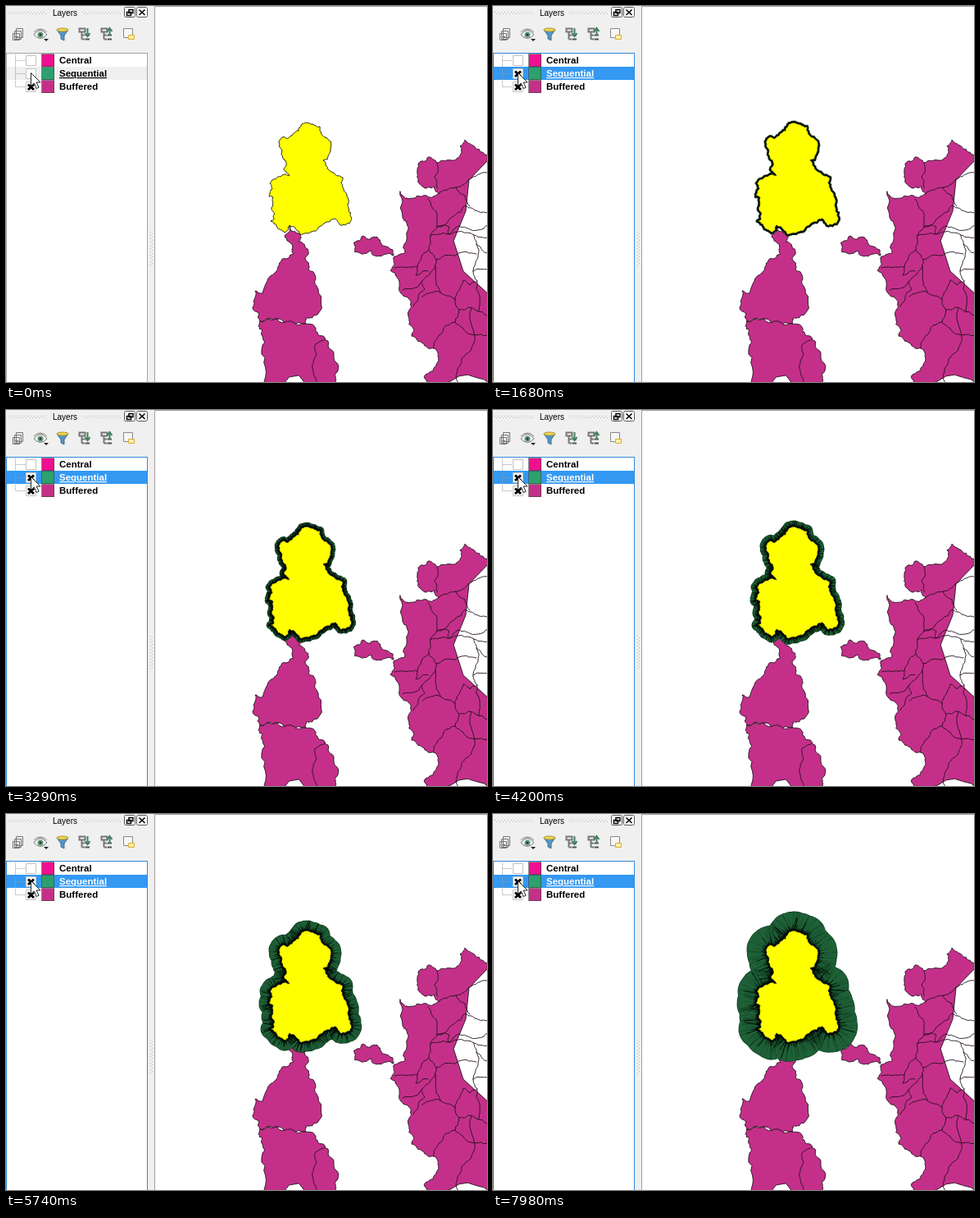
Recreate the animation shown at these times as an HTML page. Size 587 by 458 pixels, loop 8 s.

```html
<!DOCTYPE html>
<html lang="en">
<head>
<meta charset="utf-8">
<title>Sequential buffer</title>
<style>
  html, body { margin: 0; width: 100%; height: 100%; overflow: hidden; background: #fff; }
  svg { display: block; width: 587px; height: 458px; }
  text { font-family: "Liberation Sans", Arial, sans-serif; }
  .name { font-size: 11.5px; font-weight: bold; }
  .crisp { shape-rendering: crispEdges; }
  #map path { stroke-linejoin: round; stroke-linecap: round; }
</style>
</head>
<body>
<svg viewBox="0 0 587 458">
  <defs>
    <path id="box" d="M24.5 .5h12v12h-12z" fill="#fff" stroke="#c3c3c3"/>
    <path id="cross" d="M27 3.5l7 6.5m0-6.5l-7 6.5" stroke="#000" stroke-width="3"/>
    <g id="tree" fill="none" stroke="#777">
      <path d="M.5 .5h7v4h-7zm3 4v9m0-5h4m-4 5h4"/>
      <path d="M8 8.5h5m-5 5h5" stroke="#4b5157" stroke-width="2"/>
    </g>
  </defs>

  <g id="map"></g>

  <rect width="181" height="458" fill="#f0f0f0"/>
  <path class="crisp" d="M181.5 458V.5H587" fill="none" stroke="#a0a0a0"/>
  <g fill="none" stroke="#b5b5b5" stroke-dasharray="1 3">
    <path d="M2 7.5h48m-46 2h46m43-2h48m-46 2h46"/>
    <path d="M176.5 275v41m2-39v39"/>
  </g>
  <text x="57" y="12" font-size="10">Layers</text>
  <g fill="#fff" stroke="#555">
    <rect x="144.5" y="1.5" width="13" height="12" rx="2"/>
    <rect x="159.5" y="1.5" width="13" height="12" rx="2"/>
    <path d="M150 4.5h5v4h-5zm-2.500 3h5v4h-5z" stroke="#000" stroke-width="1.5"/>
    <path d="M162.500 4.500l7 6.500m0-6.500l-7 6.500" stroke="#000" stroke-width="1.7"/>
  </g>

  <path d="M12.5 27.5h8v11h-8zm-2 3h8v10h-8zm-2 3h8v8h-8zm1.500 4h5m-2.500-2.500v5" fill="#eee" stroke="#777"/>
  <path d="M34 35q8-11 16 0q-8 9-16 0zm0-3q8-8 16 0" fill="#f7f7f7" stroke="#777"/>
  <circle cx="42" cy="35" r="3.5" fill="#5d9977"/><circle cx="42" cy="35" r="1.5" fill="#333"/>
  <path d="M46 40h6l-3 3z" fill="#222"/>
  <path d="M62 29h14l-5 7v6l-4-2v-4z" fill="#5793c4" stroke="#47718f"/>
  <ellipse cx="69" cy="29" rx="7" ry="2" fill="#f3d64b" stroke="#a89336"/>
  <g fill="none" stroke="#43815f" stroke-width="2">
    <use href="#tree" x="89" y="27"/><path d="M99.5 27v9m-3-3l3 4 3-4"/>
    <use href="#tree" x="116" y="27"/><path d="M126.5 36v-9m-3 4l3-4 3 4"/>
  </g>
  <path d="M143.5 27.5h11v11h-11z" fill="#f6f6f6" stroke="#888"/>
  <path d="M149.5 35.5h7v5h-7z" fill="#fff0a6" stroke="#d9ad38"/>

  <rect id="list" class="crisp" x=".5" y="57.5" width="172" height="401" fill="#fff"/>
  <rect id="row" class="crisp" x="1" y="74" width="171" height="16"/>
  <path class="crisp" d="M11.5 59v40m0-32.500h11m-11 16h11m-11 16h11" fill="none" stroke="#999" stroke-dasharray="1 1"/>
  <g class="crisp" stroke="#444" stroke-opacity=".65">
    <rect x="43.5" y="58.5" width="15" height="15" fill="#f0108f"/>
    <rect x="43.5" y="74.5" width="15" height="15" fill="#2ca16d"/>
    <rect x="43.5" y="90.5" width="15" height="15" fill="#c43089"/>
  </g>
  <use href="#box" y="60"/><use href="#box" y="76"/><use href="#box" y="92"/>
  <use id="check" href="#cross" y="76"/><use href="#cross" y="92"/>
  <text class="name" x="65" y="70">Central</text>
  <text class="name" id="label" x="65" y="86" text-decoration="underline">Sequential</text>
  <text class="name" x="65" y="102">Buffered</text>
  <path d="M30.5 81.5v16l3.800-3.500 3 6.500 2.800-1.300-3-6.200h5z" fill="#fff" stroke="#222"/>
</svg>

<script>
const LOOP = 8000;
const $ = id => document.getElementById(id);

let seed = 41;
const random = () => (seed = seed * 16807 % 2147483647) / 2147483647;

const parse = text => text.trim().split(/\s+/).map(p => p.split(',').map(Number));

// Midpoint displacement gives the coarse outlines their ragged edge.
function roughen(points, closed, amount = .42) {
  for (let depth = 0; depth < 3; depth++) {
    points = points.flatMap((p, i) => {
      if (!closed && i === points.length - 1) return [p];
      const q = points[(i + 1) % points.length];
      const dx = q[0] - p[0], dy = q[1] - p[1];
      if (Math.hypot(dx, dy) < 2) return [p];
      const k = (random() - .5) * amount;
      return [p, [p[0] + dx / 2 + dy * k, p[1] + dy / 2 - dx * k]];
    });
  }
  return points;
}

const toPath = (points, closed) =>
  'M' + points.map(p => p.map(v => v.toFixed(1)).join(' ')).join('L') + (closed ? 'Z' : '');

function addPath(attributes) {
  const path = document.createElementNS('http://www.w3.org/2000/svg', 'path');
  for (const key in attributes) path.setAttribute(key, attributes[key]);
  return $('map').appendChild(path);
}

const ink = { stroke: '#231020', 'stroke-width': .9 };
const area = text => addPath({ d: toPath(roughen(parse(text), true), true), fill: '#c43089', ...ink });
const border = text => addPath({ d: toPath(roughen(parse(text), false, .3)), fill: 'none', ...ink });

area(`346,268 353,275 359,278 357,287 369,297 365,308 369,321 379,341 380,376 366,380
  366,387 331,381 310,384 301,367 304,347 313,350 329,324 336,310 351,302 349,290 340,281`);
area(`310,384 331,381 350,385 366,387 377,391 389,404 400,422 402,448 400,462 315,462
  312,418 313,402 308,390`);
border('389,406 377,413 375,432 376,450 381,462');
area(`425,288 436,280 445,284 449,281 457,288 472,297 473,304 458,305 445,298 432,301 426,300`);
area(`481,226 489,234 506,232 518,233 528,228 523,220 512,222 505,217 502,199 503,192
  515,184 526,191 547,188 556,177 554,171 560,163 573,173 580,178 592,184 592,462 514,462
  511,450 521,445 525,437 522,417 511,414 495,402 498,395 491,378 494,362 482,350 480,342
  469,322 474,305 487,300 486,290 491,269 484,258`);

border('526,191 527,203 523,209 526,222');
border('528,229 549,221 570,208 592,205');
border('515,235 526,269 518,280 516,297 502,318 474,319');
border('526,269 535,267 560,243 572,249 592,256');
border('549,221 566,244');
border('526,269 541,269 540,278 552,268 566,272 592,266');
border('516,297 525,309 556,300 574,302');
border('517,280 540,278 571,279 574,290 592,302');
border('571,279 592,280');
border('574,290 570,323 575,335 577,372');
border('525,309 524,317 508,335 484,346');
border('502,318 500,328 515,323');
border('508,335 511,345 497,366');
border('508,354 530,349 548,358 553,370 548,385 526,405 522,417');
border('524,317 525,340 530,349');
border('548,358 558,334 566,340 575,335');
border('553,370 565,367 592,386');
border('548,385 568,400 592,400');
border('568,368 567,420 556,430 552,462');
border('570,323 592,322');

const outline = roughen(parse(`
  368,142 375,144 383,147 391,160 396,177 392,187 387,188 390,194 400,203 405,207 411,209
  411,221 418,236 418,246 421,252 419,265 414,267 408,267 401,259 390,264 382,269 373,275
  359,278 355,273 346,267 340,276 331,269 323,262 327,259 324,247 326,233 321,232 325,222
  322,216 327,211 340,205 346,207 339,199 341,188 334,172 333,165 337,160 349,158 357,152
  360,145`), true);
const outlinePath = toPath(outline, true);

const ring = (stroke, extra) => addPath({ d: outlinePath, fill: 'none', stroke, ...extra });
const rays = extra => addPath({ fill: 'none', ...extra });
const rim = ring('#103c22');
const band = ring('#1e6037');
const faint = rays({ stroke: '#06200f', 'stroke-opacity': .38, 'stroke-width': .7 });
const shade = ring('#000', { 'stroke-opacity': .7 });
const dark = rays({ stroke: '#000', 'stroke-opacity': .85, 'stroke-width': .9 });
addPath({ d: outlinePath, fill: '#ff0', stroke: '#111', 'stroke-width': .9 });

// Seams run outward from each vertex; most of them die out close to the edge.
const seams = outline.map(([x, y], i) => {
  const n = outline.length;
  const a = outline[(i + n - 4) % n], b = outline[(i + 4) % n];
  const angle = Math.atan2(a[0] - b[0], b[1] - a[1]) + (random() - .5) * .35;
  const reach = 2 + 1.6 / (random() + .07);
  return { x, y, dx: Math.cos(angle), dy: Math.sin(angle), reach };
});
const drawRays = (path, limit, scale) => path.setAttribute('d', seams.map(s => {
  const l = Math.min(limit, s.reach * scale);
  return toPath([[s.x, s.y], [s.x + s.dx * l, s.y + s.dy * l]]);
}).join(''));

function stepAt(time) {
  if (time < 700) return -1;
  if (time < 840) return 0;
  const t = time - 840;
  return 1 + 5 * Math.floor(t / 1120) + Math.min(4, Math.floor(t % 1120 / 210));
}

function draw(step) {
  const on = step >= 0;
  const radius = on ? .4 + .36 * step + .00031 * step ** 3 : 0;
  const width = (path, r) => path.setAttribute('stroke-width', Math.max(0, 2 * r));
  width(rim, radius);
  width(band, radius - .7);
  width(shade, Math.min(radius * .65, 2.4));
  drawRays(faint, radius, 4);
  drawRays(dark, radius * .9, 1);
  for (const path of [faint, dark]) path.style.display = on ? '' : 'none';
  $('check').style.display = on ? '' : 'none';
  $('row').setAttribute('fill', on ? '#3399f3' : '#f0f0f0');
  $('list').setAttribute('stroke', on ? '#3388d8' : '#a3a7ad');
  $('label').setAttribute('fill', on ? '#fff' : '#000');
}

const start = performance.now();
let shown;
function tick() {
  const step = stepAt((performance.now() - start) % LOOP);
  if (step !== shown) draw(shown = step);
  requestAnimationFrame(tick);
}
tick();
</script>
</body>
</html>
```
